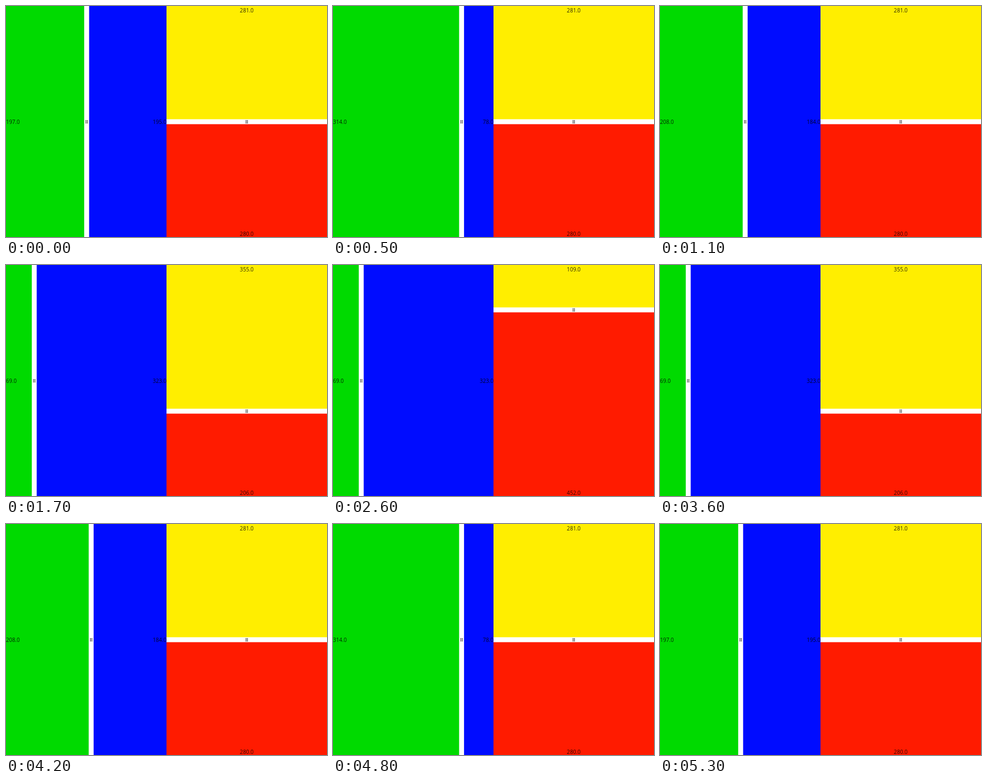
Animation of 600x431 px, one loop 5400 ms. Source, as an HTML page:

```html
<!DOCTYPE html>
<html lang="en">
<head>
<meta charset="utf-8">
<title>Split panes</title>
<style>
  html, body { margin: 0; width: 100%; height: 100%; overflow: hidden; background: #fff; }
  svg { display: block; width: 100vw; height: 100vh; }
  text { font: 10.1px "Open Sans", "Noto Sans", sans-serif; fill: #000; fill-opacity: .82; }
</style>
</head>
<body>
<svg viewBox="0 0 600 431">
  <defs>
    <path id="grip" fill="#222" d="M-2.1-3h1.5v1.5h-1.5z M.6-3h1.5v1.5H.6z M-2.1-.7h1.5V.8h-1.5z M.6-.7h1.5V.8H.6z M-2.1 1.6h1.5v1.5h-1.5z M.6 1.6h1.5v1.5H.6z"/>
  </defs>
  <rect width="300" height="431" fill="#00da00"/>
  <rect id="blue" height="431" fill="#000cff"/>
  <rect x="300" width="300" height="431" fill="#ffee00"/>
  <rect id="red" x="300" width="300" fill="#ff1b00"/>
  <g id="columnBar"><rect x="-4.6" y="-216" width="9.2" height="431" fill="#fff"/><use href="#grip"/></g>
  <g id="rowBar"><rect x="-150" y="-4.6" width="300" height="9.2" fill="#fff"/><use href="#grip"/></g>
  <text id="leftLabel" x="0" y="220"/>
  <text id="rightLabel" x="300" y="220" text-anchor="end"/>
  <text id="topLabel" x="450" y="11.5" text-anchor="middle"/>
  <text id="bottomLabel" x="450" y="428.7" text-anchor="middle"/>
</svg>
<script>
const WIDTH = 392, HEIGHT = 561;   // pane sizes in label units
const STEP = 100, STEPS = 54, TURN = 26;
const leftKeys = [[0, 197], [6, 323], [11, 208], [14, 69]];
const topKeys = [[14, 281], [17, 355], [20, 452], [26, 109]];
const el = id => document.getElementById(id);

// Slope at a key: flat at ends and turning points.
function slope(keys, i) {
  if (i === 0 || i === keys.length - 1) return 0;
  const [[t0, v0], [t1, v1], [t2, v2]] = keys.slice(i - 1, i + 2);
  return (v1 - v0) * (v2 - v1) <= 0 ? 0 : (v2 - v0) / (t2 - t0);
}

function sample(keys, t) {
  const last = keys.length - 1;
  if (t <= keys[0][0]) return keys[0][1];
  if (t >= keys[last][0]) return keys[last][1];
  const i = keys.findIndex(key => key[0] > t) - 1;
  const [t0, v0] = keys[i], [t1, v1] = keys[i + 1];
  const span = t1 - t0, u = (t - t0) / span, w = 1 - u;
  return v0 * w * w * (1 + 2 * u) + v1 * u * u * (3 - 2 * u)
    + span * u * w * (slope(keys, i) * w - slope(keys, i + 1) * u);
}

function setLabel(id, value) {
  el(id).textContent = value.toFixed(1);
}

function draw(now) {
  const step = Math.floor(now / STEP) % STEPS;
  const pose = step <= TURN ? step : STEPS - 1 - step;
  const left = Math.round(sample(leftKeys, pose));
  const top = Math.round(sample(topKeys, pose));
  const x = left * 300 / WIDTH, y = top * 431 / HEIGHT;

  el("blue").setAttribute("x", x);
  el("blue").setAttribute("width", 300 - x);
  el("red").setAttribute("y", y);
  el("red").setAttribute("height", 431 - y);
  el("columnBar").setAttribute("transform", `translate(${x} 216)`);
  el("rowBar").setAttribute("transform", `translate(450 ${y})`);
  setLabel("leftLabel", left);
  setLabel("rightLabel", WIDTH - left);
  setLabel("topLabel", top);
  setLabel("bottomLabel", HEIGHT - top);
}

const start = performance.now();
function tick() {
  draw(performance.now() - start);
  requestAnimationFrame(tick);
}
tick();
</script>
</body>
</html>
```
